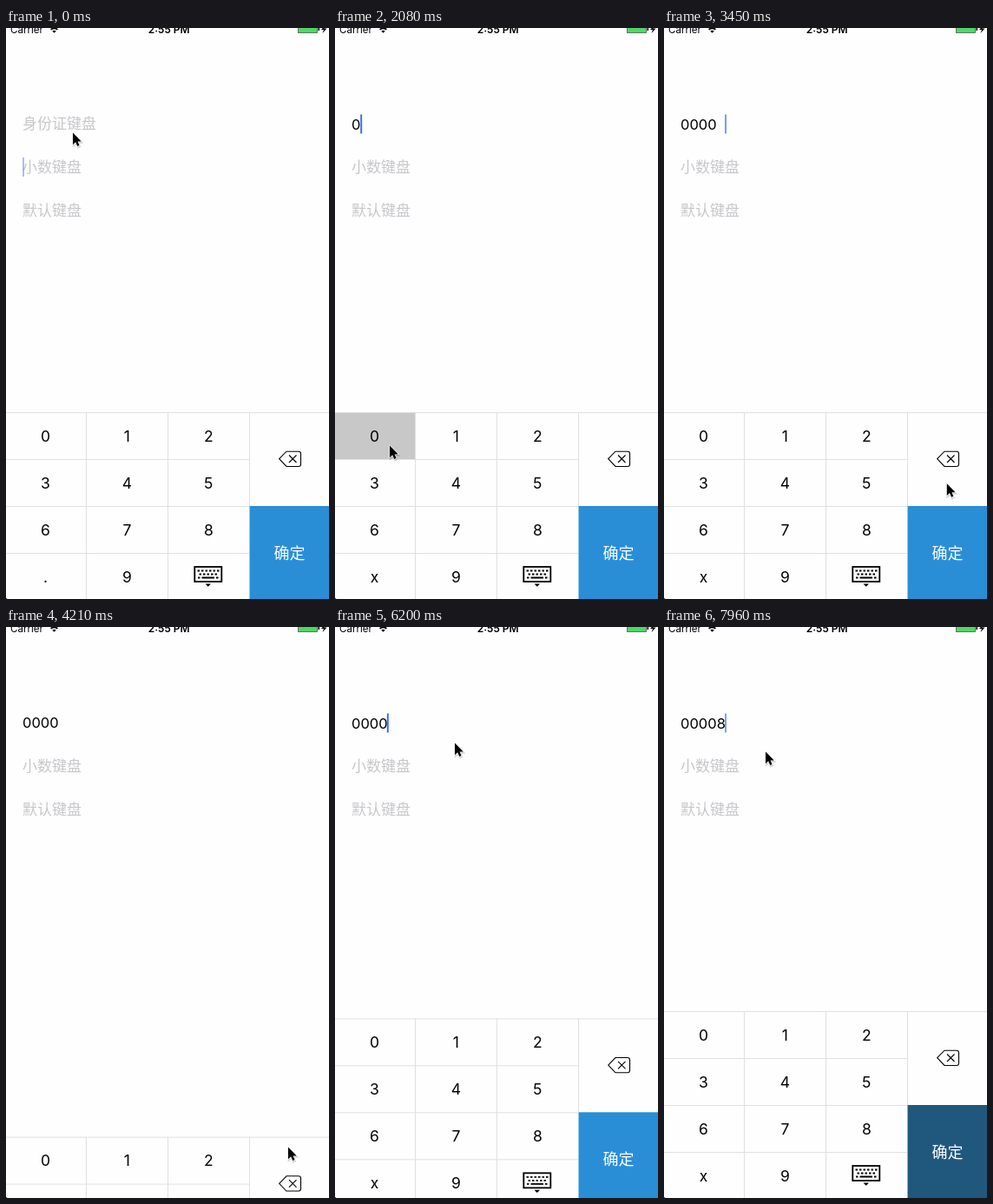
An HTML page that plays this animation: 372 px wide and 657 px high, repeating every 7990 ms.

```html
<!DOCTYPE html>
<html lang="zh-CN">
<head>
<meta charset="utf-8">
<title>Keyboard demo</title>
<style>
  html, body { margin: 0; width: 100%; height: 100%; overflow: hidden; background: #fefefe; }
  svg { display: block; width: 372px; height: 657px; }
  text { font-family: Inter, "Noto Sans CJK SC", "Noto Sans CJK", sans-serif; }
  .hint { font: 17px "Noto Sans CJK SC", "Noto Sans CJK", sans-serif; fill: #c7c7cb; }
  .value { font-size: 16.5px; }
  .key { font-size: 17.5px; text-anchor: middle; }
  .ok { font: 18px "Noto Sans CJK SC", "Noto Sans CJK", sans-serif; fill: #fff; text-anchor: middle; }
  .line { fill: none; stroke: #e0e0e0; }
  .status { font-size: 11.6px; }
  .time { font-size: 12px; font-weight: 600; text-anchor: middle; }
</style>
</head>
<body>
<svg viewBox="0 0 372 657">
  <defs>
    <path id="arrow" d="M0 0V14.5L3.4 11.4L5.6 16.4L8 15.4L5.9 10.5H10.4Z"/>
  </defs>
  <rect width="372" height="657" fill="#fefefe"/>

  <g id="statusBar">
    <text class="status" x="5" y="5.5">Carrier</text>
    <path d="M51 1.2Q55.5 -2.5 60 1.2L58.7 2.5Q55.5 0 52.3 2.5ZM53.3 3.5Q55.5 1.8 57.7 3.5L55.5 5.7Z"/>
    <text class="time" x="187.7" y="5.5">2:55 PM</text>
    <rect x="336.5" y="-4" width="22" height="9.5" fill="#4cd964" stroke="#555" stroke-width=".8"/>
    <path d="M359.5 -1h1.5v4h-1.5zM367.5 -3L363 2h3l-1.5 4 5-5.5h-3z"/>
  </g>

  <text class="hint" id="idHint" x="19" y="116">身份证键盘</text>
  <text class="hint" x="19" y="166">小数键盘</text>
  <text class="hint" x="19" y="216">默认键盘</text>
  <text class="value" id="value" x="19"></text>
  <rect id="caret" width="2" height="22" fill="#426bf2"/>

  <g id="keyboard">
    <rect y="442" width="372" height="216" fill="#fefefe"/>
    <rect id="pressed" fill="#c8c8c8"/>
    <path class="line" d="M0 442.5H372M0 496.5H280M0 550.5H280M0 604.5H280M92.5 442V658M186.5 442V658M280.5 442V550"/>
    <g id="keys"></g>
    <g fill="none" stroke="#000" stroke-width="1.1">
      <path d="M314.7 495.7L323 487.2H337Q339.5 487.2 339.5 489.7V502Q339.5 504.5 337 504.5H323Z"/>
      <path d="M326 491.5l8.5 8.5m0-8.500l-8.500 8.500"/>
    </g>
    <g fill="none" stroke="#000" stroke-width="1.8">
      <rect x="217.3" y="620" width="31" height="17"/>
      <path d="M220.500 624.500H246M222.500 628.500H244" stroke-dasharray="2.500 2"/>
      <path d="M221 632.500h2.500m2 0h14.500m2 0h2.500"/>
    </g>
    <path d="M229.500 639.500h6.500l-3.250 3.300z"/>
    <rect id="okKey" x="280.500" y="550" width="92" height="108"/>
    <text class="ok" x="326.500" y="610.500">确定</text>
  </g>

  <path d="M0 655.500V657H1.500Z" fill="#333"/>
  <g id="pointer">
    <g transform="translate(1 .6) scale(.94)">
      <use href="#arrow" transform="translate(.6 1.500)" opacity=".16" stroke="#000" stroke-width="2"/>
      <use href="#arrow" stroke="#fff" stroke-width="1.200" paint-order="stroke"/>
    </g>
  </g>
</svg>

<script>
const LOOP = 7990;
const FOCUS = 400, OK = 3740, CLOSE = 4085, REOPEN = 5924, OK_AGAIN = 7660;
const PRESS = 70, CARET_LAG = 40, MOVE = 350;

const $ = id => document.getElementById(id);
const set = (node, attrs) => {
  for (const name in attrs) node.setAttribute(name, attrs[name]);
};
const within = (t, from, to) => t >= from && t < to;
const clamp = v => Math.min(1, Math.max(0, v));
const ease = v => v * v * (3 - 2 * v);

// Where the pointer rests, and when it arrives
const stops = [
  { at: 0, x: 76, y: 120 },
  { at: 1220, x: 144, y: 432 },
  { at: 1450, x: 156, y: 500 },
  { at: 1850, x: 62, y: 480 },
  { at: 3250, x: 325, y: 505 },
  { at: 3700, x: 324, y: 598 },
  { at: 4960, x: 120, y: 162 },
  { at: 5170, x: 124, y: 124 },
  { at: 6200, x: 137, y: 133 },
  { at: 7000, x: 241, y: 577 },
  { at: 7540, x: 326, y: 590 },
  { at: 7960, x: 116, y: 143 }
];

const taps = [
  ...Array.from({ length: 5 }, (_, i) => ({ at: 1900 + 217 * i, char: "0", col: 0, row: 0 })),
  { at: 3440, erase: true, col: 3, row: 0, rows: 2 },
  { at: 7270, char: "8", col: 2, row: 2 }
];
const caretResets = [-730, FOCUS, REOPEN, ...taps.map(tap => tap.at)];

const keyNodes = [..."012345678.9"].map((label, i) => {
  const node = document.createElementNS("http://www.w3.org/2000/svg", "text");
  set(node, { class: "key", x: 45.5 + 93.9 * (i % 3), y: 475.7 + 54 * Math.floor(i / 3) });
  node.textContent = label;
  return $("keys").appendChild(node);
});

const textAt = t => taps
  .filter(tap => tap.at <= t)
  .reduce((text, tap) => tap.erase ? text.slice(0, -1) : text + tap.char, "");

function pointerAt(t) {
  let { x, y } = stops[0];
  for (let i = 1; i < stops.length; i++) {
    const stop = stops[i];
    const start = Math.max(stops[i - 1].at, stop.at - MOVE);
    const k = ease(clamp((t - start) / (stop.at - start)));
    x += (stop.x - x) * k;
    y += (stop.y - y) * k;
  }
  return `${x.toFixed(2)} ${y.toFixed(2)}`;
}

// Critically damped spring, from 1 to 0
function spring(ms) {
  const a = 18.26 * ms / 1000;
  return (1 + a) * Math.exp(-a);
}

function caretOpacity(t) {
  const last = Math.max(...caretResets.filter(at => at <= t - CARET_LAG));
  const phase = (t - last) % 1000;
  return phase < 900 ? clamp((820 - phase) / 200) : (phase - 900) / 100;
}

function draw(t) {
  const closed = within(t, CLOSE, REOPEN);
  const hidden = t < CLOSE ? 0 : closed ? 1 - spring(t - CLOSE) : spring(t - REOPEN);
  set($("keyboard"), { transform: `translate(0 ${(hidden * 216).toFixed(2)})` });

  const text = textAt(t);
  $("value").textContent = text;
  set($("value"), { y: closed ? 116 : 116.5 });
  set($("idHint"), { visibility: text ? "hidden" : "visible" });
  keyNodes[9].textContent = t < FOCUS ? "." : "x";

  set($("caret"), {
    x: 19 + textAt(t - CARET_LAG).length * 10.2,
    y: t < FOCUS ? 149 : 99.5,
    opacity: closed ? 0 : caretOpacity(t)
  });

  const tap = taps.find(({ at }) => within(t, at - PRESS, at));
  set($("pressed"), { visibility: tap ? "visible" : "hidden" });
  if (tap) {
    const { col, row, rows = 1 } = tap;
    set($("pressed"), { x: 94 * col - 1, y: 443 + 54 * row, width: 93, height: 54 * rows - 1 });
  }
  const okDown = within(t, OK, CLOSE) || t >= OK_AGAIN;
  set($("okKey"), { fill: okDown ? "#20587d" : "#2a8ed7" });

  set($("pointer"), { transform: `translate(${pointerAt(t)})` });
}

function tick() {
  draw(performance.now() % LOOP);
  requestAnimationFrame(tick);
}
tick();
</script>
</body>
</html>
```
